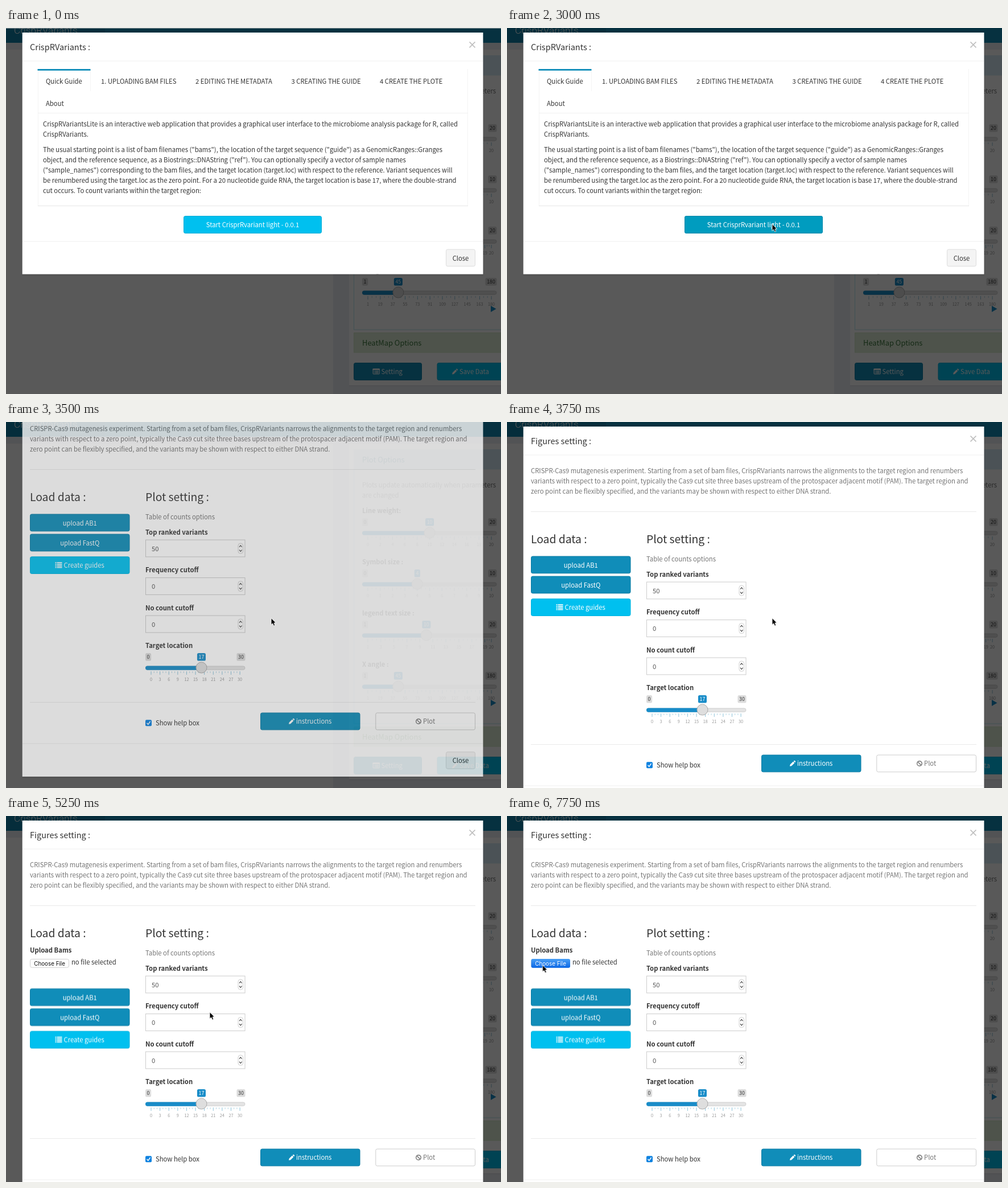
These frames come from a looping animation (870x643 px, 8000 ms). An HTML page:

```html
<!DOCTYPE html>
<html lang="en">
<head>
<meta charset="utf-8">
<title>CrispRVariants</title>
<style>
html, body { margin: 0; width: 100%; height: 100%; overflow: hidden; background: #555; }
svg { display: block; width: 870px; height: 643px; }
text { font: 11.27px "Noto Sans CJK JP", "Noto Sans CJK SC", "Noto Sans CJK", Lato, sans-serif; fill: #333; white-space: pre; }
.b { font-weight: 700; }
.mid { text-anchor: middle; }
.title { font-size: 14.5px; }
.h3 { font-size: 19.3px; }
.h4 { font-size: 12.9px; }
.tag { font-size: 8.86px; text-anchor: middle; }
.tick { font-size: 7.25px; text-anchor: middle; fill: #999; }
.logo { font: 300 17.2px Roboto, sans-serif; }
.sys { font: 9.8px Inter, "Liberation Sans", sans-serif; fill: #111; }
.x { font-size: 17px; font-weight: 700; fill: #c0c0c0; text-anchor: middle; }
.grey { fill: #747474; }
.value { fill: #555; }
.info { fill: #31708f; }
.good { fill: #3c763d; }
.white { fill: #fff; }

.anim { animation: 8s step-end -8ms infinite; }
.guide { animation-name: guide; }
.figures { animation-name: figures; }
.hover { animation-name: hover; }
.bams { animation-name: bams; }
.shift { animation-name: shift; }
.press { animation-name: press; }
.edge { animation-name: edge; }
.cursor { animation-name: cursor; }

@keyframes guide {
  0% { opacity: 1; transform: none; }
  40.625% { opacity: .5; transform: translateY(-37px); }
  43.75%, 100% { opacity: 0; transform: translateY(-37px); }
}
@keyframes figures {
  0% { opacity: 0; transform: translateY(-74px); }
  43.75% { opacity: .79; transform: translateY(-74px); }
  46.875%, 100% { opacity: 1; transform: none; }
}
@keyframes hover { 0% { opacity: 0; } 18.75% { opacity: 1; } 40.625% { opacity: .5; } 43.75%, 100% { opacity: 0; } }
@keyframes bams { 0% { opacity: 0; } 50%, 100% { opacity: 1; } }
@keyframes shift { 0% { transform: none; } 50%, 100% { transform: translateY(67.5px); } }
@keyframes press { 0% { opacity: 0; } 96.875%, 100% { opacity: 1; } }
@keyframes edge { 0% { opacity: 1; } 3.125%, 100% { opacity: 0; } }
@keyframes cursor {
  0% { transform: translate(436px, -20px); animation-timing-function: steps(5); }
  15.625% { transform: translate(461px, 354px); }
  25% { transform: translate(461px, 354px); animation-timing-function: steps(4); }
  37.5% { transform: translate(466px, 344.5px); }
  65.625% { transform: translate(358px, 344.5px); animation-timing-function: steps(4); }
  78.125% { transform: translate(118px, 581px); animation-timing-function: steps(5); }
  93.75%, 100% { transform: translate(62.5px, 262px); }
}
</style>
</head>
<body>
<script>
const BLUE = '#108db9', CYAN = '#00c0ef', SLIDE = '#188cc8';

const text = (x, y, s, c = '') => `<text x="${x}" y="${y}" class="${c}">${s}</text>`;
const lines = (x, y, rows, c) => rows.map((s, i) => text(x, y + i * 18, s, c)).join('');
const rect = (x, y, w, h, fill, more = '') =>
  `<rect x="${x}" y="${y}" width="${w}" height="${h}" fill="${fill}" ${more}/>`;
const box = (x, y, w, h, fill, line, r = 2.7) =>
  rect(x + .5, y + .5, w - 1, h - 1, fill, `stroke="${line}" rx="${r}"`);
const rule = (x1, x2, y, c = '#f0f0f0') => rect(x1, y, x2 - x1, 1, c);
const group = (c, s) => `<g class="anim ${c}">${s}</g>`;
const at = (x, y, s) => `<g transform="translate(${x} ${y})">${s}</g>`;

// Icons, drawn from their top left corner
const pencil = (x, y) => at(x, y,
  '<path d="M0 10 .7 7 6 1.7 8.4 4.1 3.1 9.4ZM6.7 1 7.6.2Q8.2-.3 8.8.2L9.9 1.3Q10.4 1.9 9.9 2.5L9.1 3.4Z" fill="#fff"/>');
const list = (x, y) => at(x, y, [0, 2.8, 5.6, 8.4].map(v =>
  rect(0, v, 2, 1.7, '#fff') + rect(3, v, 9, 1.7, '#fff')).join(''));
const card = (x, y) => at(x, y,
  '<rect x=".5" y=".5" width="11.4" height="9" rx="1" fill="none" stroke="#fff"/>' + rect(0, 0, 12.4, 2.4, '#fff') +
  [3.6, 5.4, 7.2].map(v => rect(2, v, 1.2, 1, '#fff') + rect(4, v, 6.4, 1, '#fff')).join(''));
const ban = (x, y) => at(x, y,
  '<path d="M1.7 1.7 8.3 8.3M9.3 5A4.3 4.3 0 1 1 .7 5 4.3 4.3 0 1 1 9.3 5Z" fill="none" stroke="#747474" stroke-width="1.4"/>');

const tagWidth = v => String(v).length * 4.92 + 5.2;
const tag = (x, y, v, fill, c = '') => {
  const w = tagWidth(v);
  return rect(x - w / 2, y - 7, w, 13.6, fill, 'rx="2.7"') + text(x, y + 3.2, v, 'tag ' + c);
};

// y is the middle of the value tags
function slider(x, w, y, min, max, val, step) {
  const pos = v => x + 10 + (w - 19.4) * (v - min) / (max - min);
  const marks = [];
  for (let v = min; v < max; v += step) marks.push(v);
  marks.push(max);
  let s = rect(x + .5, y + 16, w - 1, 6.2, '#e4e4e4', 'rx="3.1" stroke="#cfcfcf"');
  s += `<path d="M${pos(val)} ${y + 15.5}H${x + 3.6}a3.6 3.6 0 0 0 0 7.2H${pos(val)}Z" fill="${SLIDE}"/>`;
  marks.forEach((v, i) => {
    s += rect(pos(v) - .5, y + 25, 1, 6, '#8ec3da') + text(pos(v), y + 42, v, 'tick');
    if (i < marks.length - 1) {
      const gap = (pos(marks[i + 1]) - pos(v)) / 3;
      for (const k of [1, 2]) s += rect(pos(v) + gap * k - .5, y + 25, 1, 3, '#b4d6e4');
    }
  });
  return s + `<circle cx="${pos(val)}" cy="${y + 18.5}" r="9.5" fill="#dedede" stroke="#a9a9a9"/>` +
    tag(x + tagWidth(min) / 2, y, min, '#dcdcdc') + tag(x + w - tagWidth(max) / 2, y, max, '#dcdcdc') +
    tag(pos(val), y, val, SLIDE, 'white');
}

const field = (y, label, val) =>
  text(245, y - 9, label, 'b') + box(245, y, 175.5, 30.8, '#fff', '#ccc', 0) + text(256, y + 20, val, 'value') +
  `<rect x="408" y="${y + 6.5}" width="8.6" height="18" rx="4" fill="#fdfdfd" stroke="#d0d0d0"/>
   <path d="M410 ${y + 13}l2.3-2.8 2.3 2.8M410 ${y + 18}l2.3 2.8 2.3-2.8" fill="none" stroke="#444" stroke-width="1.1"/>`;

const shell = (h, title) =>
  rect(28.7, 8, 809.8, h, '#fff', 'filter="url(#drop)"') + text(42, 38.6, title, 'title') + text(819.5, 35.5, '×', 'x') +
  rule(29, 838, 57.5);
const close = y => box(773, y, 52, 30.6, '#f4f4f4', '#ddd') + text(799, y + 20, 'Close', 'mid');

const page =
  rect(0, 0, 870, 643, '#ecf0f5') +
  rect(0, 0, 870, 26, BLUE) + rect(0, 0, 174, 26, '#0d80a9') + text(14, 10, 'CrispRVariants', 'logo white') +
  rect(0, 38, 575, 605, '#fff') + rect(603, 38, 267, 590, '#fff') + rule(603, 870, 628, '#d2d6de') +
  rect(611.5, 48.5, 280, 481.5, '#fff', 'stroke="#bce8f1"') + rect(611, 48, 280, 35.5, '#d9edf7') +
  text(626, 71, 'Plot Options', 'h4 info') +
  lines(626, 115.2, ['Plots update automatically when parameters', 'are changed'], 'grey') +
  text(626, 160, 'Line weight:', 'b') + slider(626, 236.5, 176, 0, 20, 10, 2) +
  text(626, 250, 'Symbol size :', 'b') + slider(626, 236.5, 266, 0, 10, 4, 1) +
  text(626, 340, 'legend text size :', 'b') + slider(626, 236.5, 356, 1, 20, 10, 2) +
  text(626, 430, 'X angle :', 'b') + slider(626, 236.5, 446, 1, 180, 45, 18) +
  `<path d="M852 488v11l9.5-5.5Z" fill="${SLIDE}"/>` +
  rect(611.5, 535.5, 280, 34.5, '#dff0d8', 'stroke="#d6e9c6"') +
  text(626, 558, 'HeatMap Options', 'h4 good') +
  box(611, 588, 120, 31, BLUE, '#0c7ca4') + card(644.5, 598.5) + text(659.5, 608, 'Setting', 'white') +
  box(757.5, 588, 130, 31, CYAN, '#00acd6') + pencil(784, 598.5) + text(797, 608, 'Save Data', 'white');

const guide = shell(424.5, 'CrispRVariants :') +
  rect(56, 72, 1, 240, '#f4f4f4') + rect(811, 72, 1, 240, '#f4f4f4') +
  rect(148, 75, 1, 36, '#f4f4f4') + rect(55.5, 72, 93, 2.8, BLUE) +
  rule(56, 812, 149) + rule(56, 812, 312, '#e6e6e6') +
  text(70, 98.2, 'Quick Guide') + text(167, 98.2, '1. UPLOADING BAM FILES') + text(333, 98.2, '2 EDITING THE METADATA') +
  text(501.5, 98.2, '3 CREATING THE GUIDE') + text(657, 98.2, '4 CREATE THE PLOTE') + text(70, 136.8, 'About') +
  lines(65, 172.8, [
    'CrispRVariantsLite is an interactive web application that provides a graphical user interface to the microbiome analysis package for R, called',
    'CrispRVariants.']) +
  lines(65, 217.7, [
    'The usual starting point is a list of bam filenames ("bams"), the location of the target sequence ("guide") as a GenomicRanges::Granges',
    'object, and the reference sequence, as a Biostrings::DNAString ("ref"). You can optionally specify a vector of sample names',
    '("sample_names") corresponding to the bam files, and the target location (target.loc) with respect to the reference. Variant sequences will',
    'be renumbered using the target.loc as the zero point. For a 20 nucleotide guide RNA, the target location is base 17, where the double-strand',
    'cut occurs. To count variants within the target region:']) +
  box(312, 330, 243, 31, CYAN, '#00acd6') + group('hover', box(312, 330, 243, 31, '#009cbf', '#0086a8')) +
  text(433.5, 350, 'Start CrisprRvariant light - 0.0.1', 'mid white') +
  rule(29, 838, 374.5) + close(388.5);

const uploads =
  box(42, 235.5, 175.5, 30.8, BLUE, '#0c7ca4') + text(129.8, 255.5, 'upload AB1', 'mid white') +
  box(42, 270.6, 175.5, 30.8, BLUE, '#0c7ca4') + text(129.8, 290.6, 'upload FastQ', 'mid white') +
  box(42, 310.2, 175.5, 30.8, CYAN, '#00b4e0') + list(86.5, 320.3) + text(101.5, 330.2, 'Create guides', 'white');

const bams = text(42, 240.3, 'Upload Bams', 'b') +
  box(42, 251, 69, 15.6, '#fff', '#cfcfcf', 3) + text(49.3, 262.6, 'Choose File', 'sys') +
  group('press', rect(42.5, 251, 68.5, 15.8, 'url(#pressed)', 'rx="3"') + text(49.3, 262.6, 'Choose File', 'sys white')) +
  text(115, 261, 'no file selected');

const figures = shell(689, 'Figures setting :') +
  lines(42, 90.3, [
    'CRISPR-Cas9 mutagenesis experiment. Starting from a set of bam files, CrispRVariants narrows the alignments to the target region and renumbers',
    'variants with respect to a zero point, typically the Cas9 cut site three bases upstream of the protospacer adjacent motif (PAM). The target region and',
    'zero point can be flexibly specified, and the variants may be shown with respect to either DNA strand.'], 'grey') +
  rule(42, 825, 157, '#eaeaea') +
  text(42, 213, 'Load data :', 'h3') + text(245, 213, 'Plot setting :', 'h3') +
  group('bams', bams) + group('shift', uploads) +
  text(245, 244.7, 'Table of counts options', 'grey') +
  field(280.6, 'Top ranked variants', 50) + field(347.1, 'Frequency cutoff', 0) + field(413.6, 'No count cutoff', 0) +
  text(245, 471.2, 'Target location', 'b') + slider(245, 175.5, 487, 0, 30, 17, 3) +
  rule(42, 825, 566, '#eaeaea') +
  rect(245, 597.2, 11, 11, '#0d82e0', 'rx="2"') +
  '<path d="M247.5 602.8l2.3 2.6 3.8-5.6" fill="none" stroke="#fff" stroke-width="1.5"/>' +
  text(263, 607, 'Show help box') +
  box(447, 584.5, 175.5, 30.8, BLUE, '#0c7ca4') + pencil(497, 594.8) + text(510, 604.4, 'instructions', 'white') +
  box(649.3, 584.5, 175.7, 30.8, '#fff', '#ccc') + ban(720, 595) + text(733, 604.4, 'Plot', 'grey') +
  rule(29, 838, 638.5) + close(653.2);

const arrow = '<path d="M0 0V11.8L2.7 9.4 4.6 13.6 6.8 12.6 5 8.6H8.6Z" fill="#000" stroke="#fff" stroke-width=".9"/>';

document.body.innerHTML = `<svg viewBox="0 0 870 643">
  <defs>
    <filter id="drop" x="-5%" y="-5%" width="110%" height="110%">
      <feDropShadow dx="0" dy="1.8" stdDeviation="1.3" flood-opacity=".125"/>
    </filter>
    <linearGradient id="pressed" x2="0" y2="1">
      <stop stop-color="#4a9ff5"/><stop offset="1" stop-color="#0a67e6"/>
    </linearGradient>
  </defs>
  ${page}${rect(0, 0, 870, 643, '#000', 'opacity=".65"')}
  ${group('edge', rect(0, 0, 870, 1, '#7d8b90'))}
  ${group('guide', guide)}${group('figures', figures)}${group('cursor', arrow)}
</svg>`;
</script>
</body>
</html>
```
